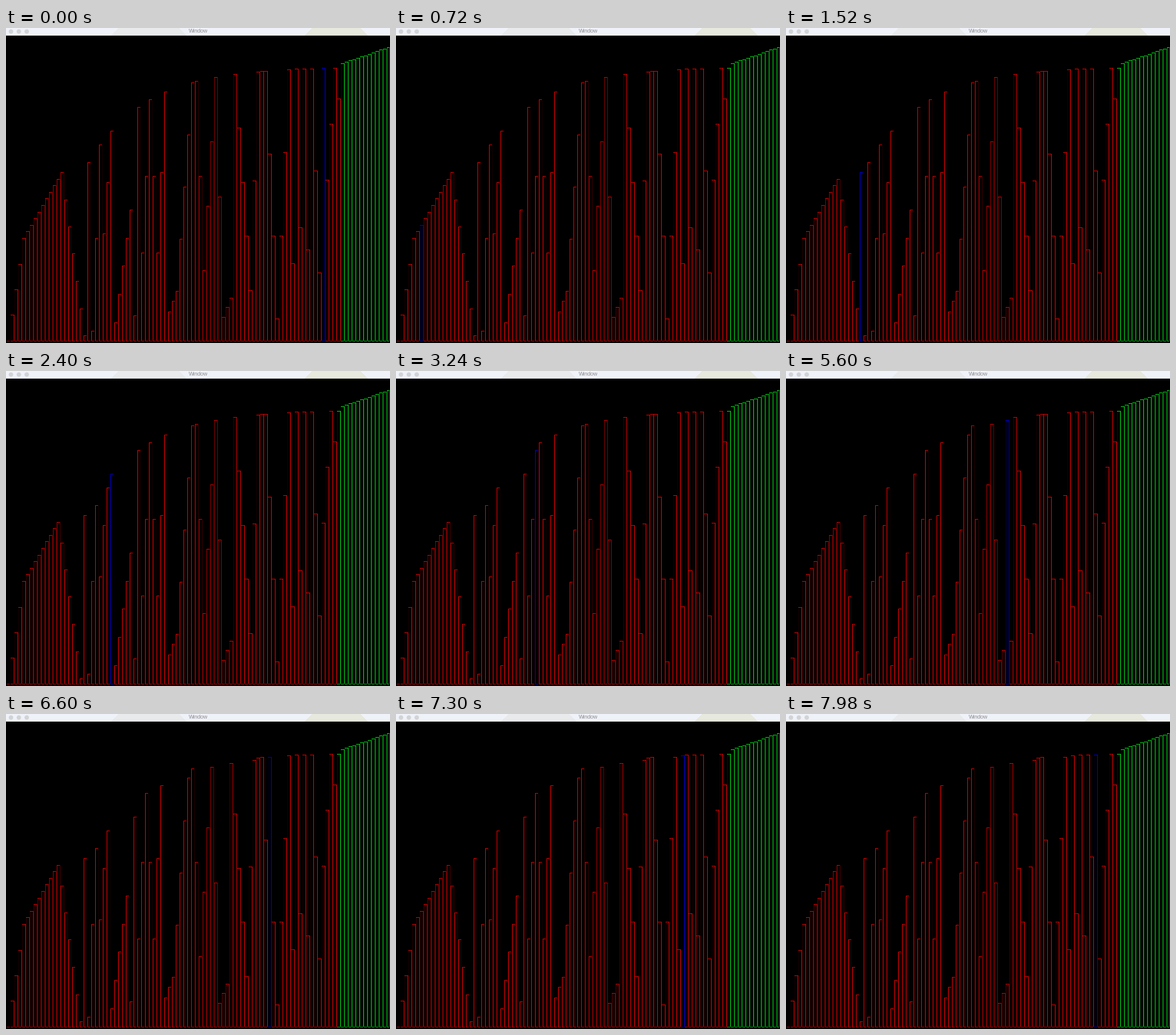
A matplotlib script that plays this animation: 500 by 411 pixels, repeating every 8 s.

```python
import numpy as np
import matplotlib.pyplot as plt
from matplotlib.animation import FuncAnimation

W, H, DPI = 500, 411, 64
INTERVAL, LOOP = 20, 8000
COUNT, PITCH, BASE = 100, 5, 408
FIRST_J, FIRST_SORTED = 82, 87

# Turning points (bar: row); tall bars follow a decaying curve instead.
TURNS = {0: 408, 4: 274, 14: 188, 20: 401, 22: 395, 25: 268, 28: 384, 32: 237, 33: 375,
         35: 293, 39: 293, 42: 370, 44: 343, 51: 316, 56: 377, 58: 352, 63: 342, 70: 379,
         74: 307, 76: 260, 78: 289, 81: 319, 83: 198, 86: 92, 87: 46, 99: 25}
PEAKS = (21, 24, 27, 34, 37, 41, 48, 49, 54, 59, 65, 67, 73, 75, 77, 79, 82, 85)

# Comparisons done by a given time, in ms.
PACE = ((0, 0), (340, 5), (1520, 24), (3240, 41.2), (5600, 62.2), (6600, 73), (7980, 85))

RED, GREEN, BLUE = np.array([(216, 0, 0), (0, 205, 20), (0, 0, 210)])


def bar_tops():
    points = TURNS | {i: 50 + 125 * np.exp((21 - i) / 15) for i in PEAKS}
    known = sorted(points)
    rows = np.interp(range(COUNT), known, [points[i] for i in known])
    return [int(round(row)) for row in rows]


def sort_states(steps):
    """Every (bars, carried index, first sorted index) of the bubble sort."""
    bars, j, end = bar_tops(), FIRST_J, FIRST_SORTED
    states = []
    for _ in range(steps + 1):
        states.append((list(bars), j, end))
        if j == end - 1:
            j, end = 0, end - 1
            continue
        if bars[j] < bars[j + 1]:
            bars[j], bars[j + 1] = bars[j + 1], bars[j]
        j += 1
    return states


def draw_bar(img, i, top, color):
    """Outline whose brightness drifts between its two edges across the window."""
    left, right = PITCH * i + 1, min(PITCH * i + 5, W - 1)
    share = np.clip(0.5 + 0.9 * np.cos(2 * np.pi * (i - 32) / 88), 0.08, 0.92)
    img[top:BASE, left] = color * share
    img[top:BASE, right] = color * (1 - share)
    img[top, left:right] = color * 0.85
    img[BASE, left:right] = color * 0.7


def title_bar():
    bar = np.full((10, W, 3), (240, 242, 250), np.uint8)
    for y in range(10):
        bar[y, 146 - y:226 + y] = (232, 234, 235)
        bar[y, 398 - y:462 + y] = (231, 232, 222)
    bar[9] = bar[9] * 0.9
    return bar


STATES = sort_states(PACE[-1][1])
TITLE = title_bar()


def render(t):
    bars, carried, end = STATES[int(np.interp(t, *zip(*PACE)) + 1e-6)]
    img = np.zeros((H, W, 3), np.uint8)
    img[:10] = TITLE
    for i, top in enumerate(bars):
        draw_bar(img, i, top, BLUE if i == carried else GREEN if i >= end else RED)
    return img


fig = plt.figure(figsize=(W / DPI, H / DPI), dpi=DPI, facecolor="black")
ax = fig.add_axes([0, 0, 1, 1])
ax.axis("off")
picture = ax.imshow(render(0), extent=(0, W, H, 0), interpolation="nearest", aspect="auto")
for x in (6.5, 16.7, 27):
    ax.add_patch(plt.Circle((x, 4.6), 2.9, color="#d2d3d6", lw=0))
ax.text(250, 4.6, "Window", family="Liberation Sans", fontsize=7 * 72 / DPI,
        color="#8c8c8e", ha="center", va="center")
ax.set_xlim(0, W)
ax.set_ylim(H, 0)


def update(frame):
    picture.set_data(render(frame * INTERVAL))
    return [picture]


anim = FuncAnimation(fig, update, frames=LOOP // INTERVAL, interval=INTERVAL,
                     repeat=True, repeat_delay=0)
plt.show()
```
